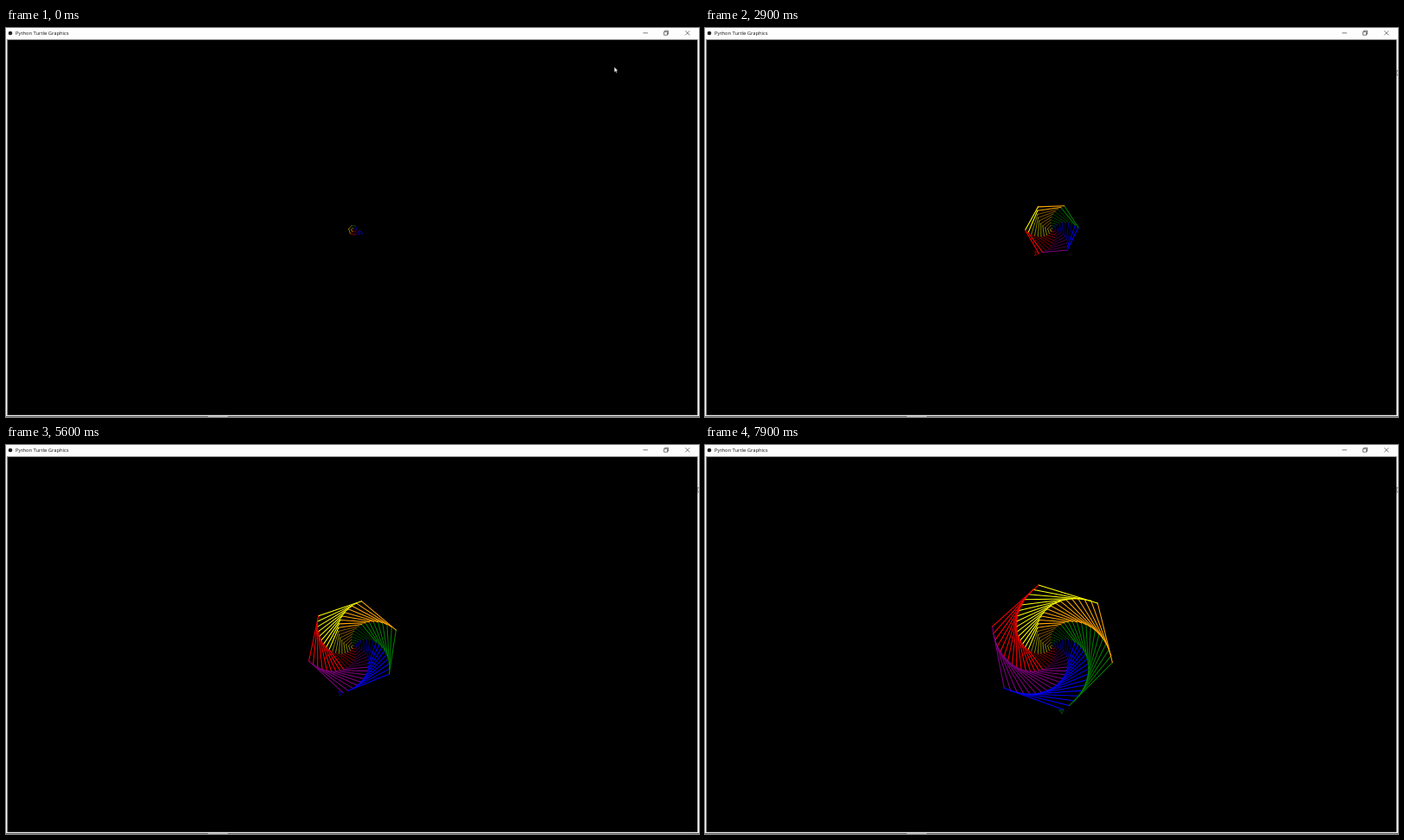
An HTML page that plays this animation: 800 by 450 pixels, repeating every 8000 ms.

```html
<!DOCTYPE html>
<html lang="en">
<head>
<meta charset="utf-8">
<title>Spiral</title>
<style>
  html, body { margin: 0; width: 100%; height: 100%; overflow: hidden; background: #000; }
  svg { display: block; width: 100vw; height: 100vh; }
  text { font: 5.8px "Open Sans", "Noto Sans", sans-serif; fill: #111; }
</style>
</head>
<body>
<svg viewBox="0 0 800 450">
  <rect width="800" height="450" fill="#f4f4f4"/>
  <rect width="800" height="12.5" fill="#fefdfe"/>
  <rect x="1" y="13" width="797.6" height="435" fill="#8a8a8a"/>
  <rect x="2" y="14" width="796" height="433.6" fill="#000"/>
  <rect y="449" width="800" height="1" fill="#5a5a5a"/>
  <rect x="233" y="449" width="23" height="1" fill="#a8a8a8"/>
  <circle cx="5" cy="6" r="2.3" fill="#222"/>
  <text x="11" y="8.1">Python Turtle Graphics</text>
  <g fill="none" stroke="#222" stroke-width=".6">
    <path d="M735.5 5.8h5.4"/>
    <path d="M759.6 4.3h3.9v3.9h-3.9zM760.7 4.3v-1.1h3.9v3.9h-1.1"/>
    <path d="M784.2 3.3l5 5M789.2 3.3l-5 5"/>
  </g>
  <g transform="translate(401.7 233) scale(.52083)">
    <g id="lines" stroke-linecap="round"></g>
    <path id="turtle" d="M0 0L-9 5L-7 0L-9 -5Z" fill="#000" stroke-width="1"/>
  </g>
  <path id="pointer" d="M0 0V6.2L1.4 5L2.3 7L3.3 6.6L2.4 4.6H4.3Z" fill="#fff" stroke="#000" stroke-width=".4"/>
</svg>
<script>
const LOOP = 8000, TICK = 100;
const STEPS = 145, TURN = 59;
const START_STEP = 14.29, STEPS_PER_MS = 0.01608;
const COLORS = ['#f00', '#800080', '#00f', '#008000', '#ffa500', '#ff0'];

const byId = id => document.getElementById(id);
const turtle = byId('turtle'), pointer = byId('pointer');

// Each step goes forward by its own number, then turns left.
const corners = [[0, 0]];
const lines = [];
for (let n = 0; n < STEPS; n++) {
  const [x, y] = corners[n];
  const a = n * TURN * Math.PI / 180;
  const end = [x + n * Math.cos(a), y - n * Math.sin(a)];
  corners.push(end);

  const line = document.createElementNS('http://www.w3.org/2000/svg', 'path');
  line.setAttribute('d', `M${x} ${y}L${end[0]} ${end[1]}`);
  line.setAttribute('stroke', COLORS[n % 6]);
  line.setAttribute('stroke-width', Math.round(n / 100 + 1));
  byId('lines').append(line);
  lines.push(line);
}

function drawSpiral(t) {
  const progress = START_STEP + t * STEPS_PER_MS;
  const step = Math.floor(progress), part = progress - step;
  // The four equal parts of a step: colour, width, forward, left.
  const done = step + (part >= 0.5 ? 1 : 0);
  const heading = TURN * (step + (part >= 0.75 ? 1 : 0));

  lines.forEach((line, i) => line.setAttribute('visibility', i < done ? 'visible' : 'hidden'));
  turtle.setAttribute('stroke', COLORS[step % 6]);
  turtle.setAttribute('transform', `translate(${corners[done]}) rotate(${-heading})`);
}

function drawPointer(t) {
  const u = Math.min(1, Math.max(0, t / 700));
  const k = u * u * (3 - 2 * u);
  pointer.setAttribute('transform', `translate(${702.2 + 96.6 * k} ${45 + 3.8 * k})`);
}

function render(now) {
  const t = Math.floor(now % LOOP / TICK) * TICK;
  drawSpiral(t);
  drawPointer(t);
}

const began = performance.now();
function frame() {
  render(performance.now() - began);
  requestAnimationFrame(frame);
}
frame();
</script>
</body>
</html>
```
